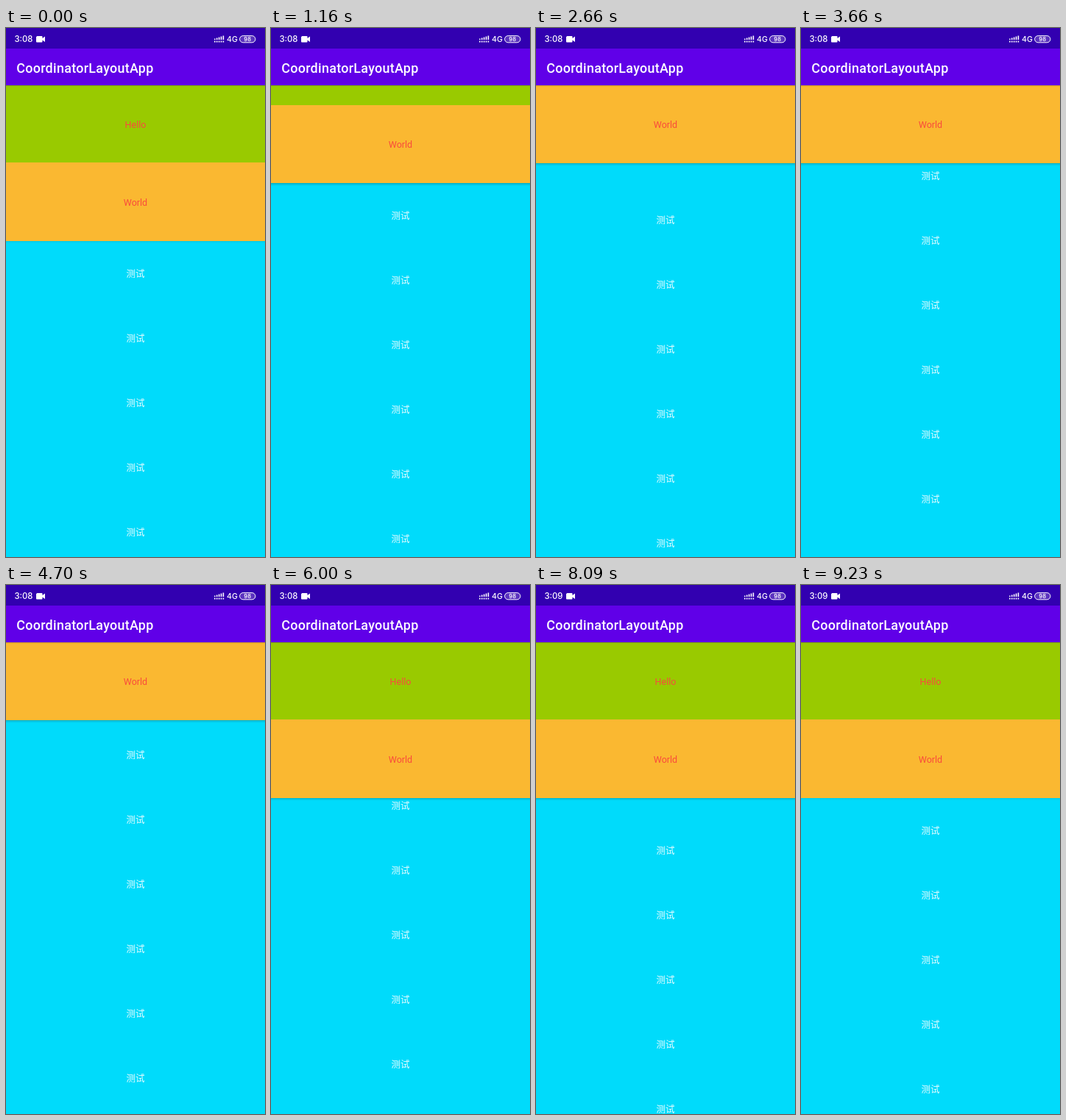
Animation of 352 by 720 pixels, one loop 9.43 s. Source, as an HTML page:

```html
<!DOCTYPE html>
<html lang="zh">
<head>
<meta charset="utf-8">
<title>CoordinatorLayoutApp</title>
<style>
  html, body { margin: 0; width: 100%; height: 100%; overflow: hidden; background: #00dbfb; }
  svg { display: block; width: 100%; height: 100%; }
  text { font-family: Roboto, sans-serif; fill: #fff; }
  .panel { width: 352px; shape-rendering: crispEdges; }
  .title { font-size: 17.9px; font-weight: 500; letter-spacing: .31px; }
  .label { font-size: 12.5px; fill: #f94b3c; text-anchor: middle; }
  .item { font: 12.5px "Noto Sans CJK SC", "Noto Sans CJK", sans-serif; text-anchor: middle; fill: #eafcff; }
  .status { font: 500 11.3px Inter, sans-serif; }
</style>
</head>
<body>
<svg viewBox="0 0 352 720">
  <defs>
    <linearGradient id="shade" x2="0" y2="1">
      <stop offset="0" stop-opacity=".2"/>
      <stop offset="1" stop-opacity="0"/>
    </linearGradient>
  </defs>
  <rect class="panel" height="720" fill="#00dbfb"/>
  <g id="list"></g>

  <g id="header">
    <rect class="panel" y="77.6" height="106" fill="#99ca00"/>
    <text class="label" x="176" y="135.7">Hello</text>
    <rect class="panel" y="183.3" height="106.3" fill="#fab831"/>
    <text class="label" x="176" y="241.6">World</text>
    <rect id="lift" class="panel" y="289.6" height="4" fill="url(#shade)"/>
  </g>

  <rect class="panel" y="78" height="2" fill="url(#shade)"/>
  <rect class="panel" y="28" height="50" fill="#6000e8"/>
  <text class="title" x="14.2" y="60.7">CoordinatorLayoutApp</text>

  <rect class="panel" height="28" fill="#3200b0"/>
  <text id="clock" class="status" x="11.5" y="19.3">3:08</text>
  <path fill="#fff" d="M42 11h6.500q1 0 1 1v2l3.500-2.500v7.500l-3.500-2.500v2q0 1-1 1h-6.500q-1 0-1-1v-6q0-1 1-1z"/>
  <g id="signal" fill="#fff"></g>
  <text class="status" x="300" y="19.2" style="font-size:10.5px">4G</text>
  <rect x="317.6" y="10.600" width="21.300" height="9.200" rx="4.600" fill="#fff" fill-opacity=".2" stroke="#fff"/>
  <text class="status" x="328.2" y="18" text-anchor="middle" style="font-size:7.6px;font-weight:600">98</text>
</svg>
<script>
const LOOP = 9430, ITEM = 88, COLLAPSE = 105.8, CLOCK_TICK = 6500;
const $ = id => document.getElementById(id);

// [ms, position]
const headerKeys = [
  [0, 0], [800, 0], [1160, 78.3], [1300, COLLAPSE], [5000, COLLAPSE], [5400, 0],
  [6250, 0], [6600, COLLAPSE], [7180, COLLAPSE], [7290, 75.5], [7560, 0], [LOOP, 0]
];
const scrollKeys = [
  [0, 0], [1300, 0], [1900, 190], [2660, 318.7], [3500, 470], [4200, 445],
  [4700, 436.7], [5000, 430], [5400, 430], [6000, 121.5], [6250, 100],
  [6600, 100], [7050, 170], [7560, 170], [8450, 0], [LOOP, 0]
];

// Monotone cubic interpolation: smooth, with no overshoot
function track(keys) {
  const slope = i => (keys[i + 1][1] - keys[i][1]) / (keys[i + 1][0] - keys[i][0]);
  const tangent = i => {
    if (i === 0 || i === keys.length - 1) return 0;
    const a = slope(i - 1), b = slope(i);
    return a * b <= 0 ? 0 : 2 * a * b / (a + b);
  };
  return t => {
    const i = keys.findIndex((key, n) => n + 1 < keys.length && t < keys[n + 1][0]);
    const [t0, p0] = keys[i], [t1, p1] = keys[i + 1];
    const d = t1 - t0, u = (t - t0) / d, v = 1 - u;
    return p0 * v * v * (1 + 2 * u) + p1 * u * u * (3 - 2 * u)
      + d * u * v * (tangent(i) * v - tangent(i + 1) * u);
  };
}
const headerAt = track(headerKeys), scrollAt = track(scrollKeys);

$("list").innerHTML = Array.from({ length: 14 }, (_, i) =>
  `<text class="item" x="176" y="${338.7 + i * ITEM}">测试</text>`).join("");

$("signal").innerHTML = Array.from({ length: 5 }, (_, i) => {
  const x = 283 + i * 2.9, h = 1.5 + i;
  return `<rect x="${x}" y="${16 - h}" width="1.6" height="${h}"/>
    <rect x="${x}" y="17.5" width="1.6" height="2"/>`;
}).join("");

function draw(now) {
  const t = now % LOOP, h = headerAt(t), s = scrollAt(t);
  $("header").setAttribute("transform", `translate(0 ${-h})`);
  $("list").setAttribute("transform", `translate(0 ${-h - s})`);
  $("lift").setAttribute("opacity", h + s > 0 ? 1 : .4);
  $("clock").textContent = t < CLOCK_TICK ? "3:08" : "3:09";
  requestAnimationFrame(() => draw(performance.now()));
}
draw(performance.now());
</script>
</body>
</html>
```
